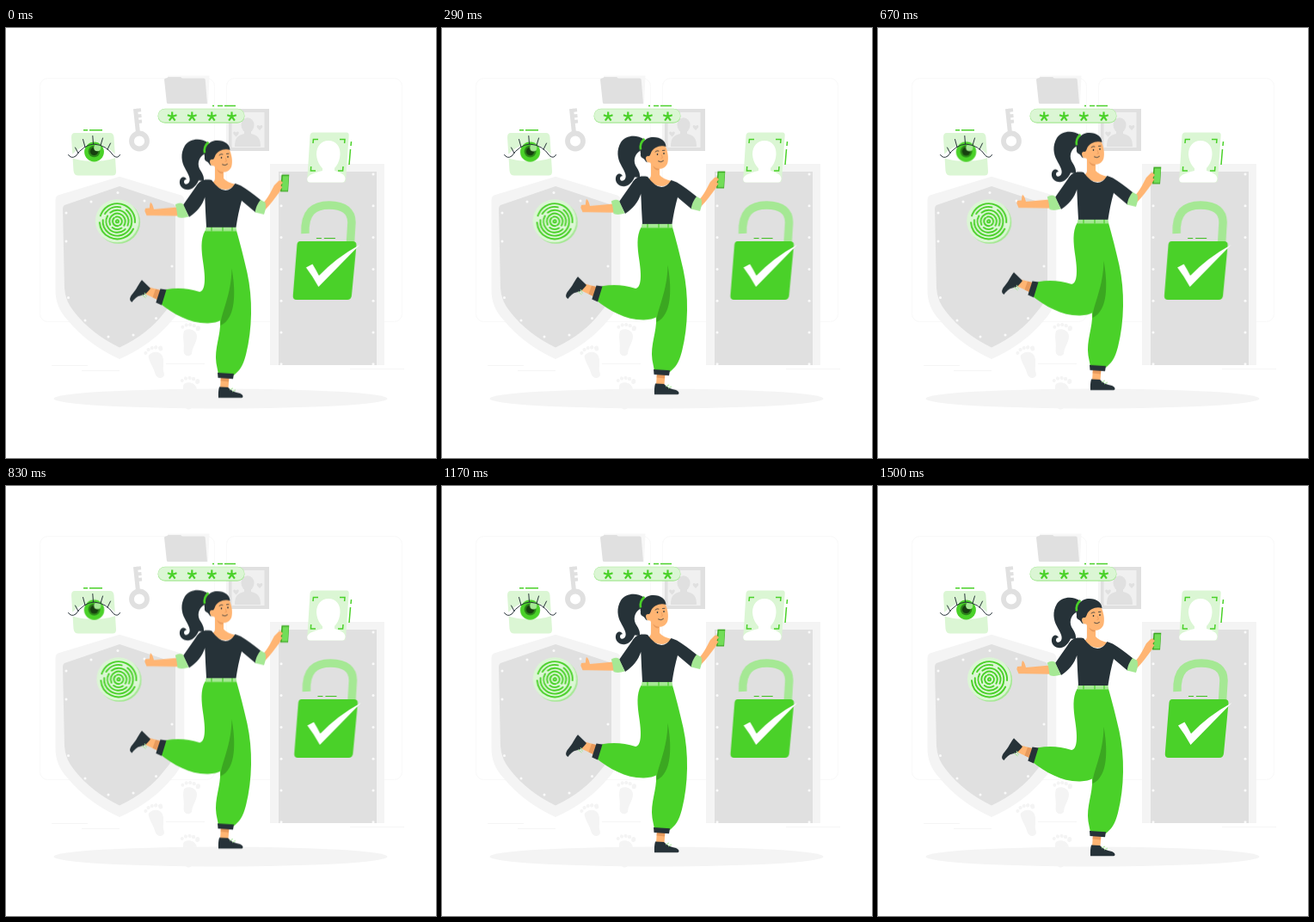
An HTML page that plays this animation: 500x500 px, repeating every 1.54 s.

```html
<!DOCTYPE html>
<html lang="en">
<head>
<meta charset="utf-8">
<title>Secure access</title>
<style>
html, body { margin: 0; width: 100%; height: 100%; overflow: hidden; background: #fff; }
svg { display: block; width: 100vw; height: 100vh; }
.green { fill: #4ad129; }
.mid { fill: #a5e894; }
.pale { fill: #dbf6d4; }
.dark { fill: #263238; }
.skin { fill: #ffb573; }
.tan { fill: #e89a5c; }
.shade { fill: #3ba721; }
.g1 { fill: #e0e0e0; }
.g2 { fill: #f4f4f4; }
.white { fill: #fff; }
.line { fill: none; stroke: #4ad129; stroke-width: 1.5; }
.ink { fill: none; stroke: #263238; stroke-linecap: round; }
.faint { fill: none; stroke: #f9f9f9; }

/* 1500 ms of motion, then a short rest */
.float, .shake, .pulse { animation: 1540ms linear -20ms infinite; }
.float { animation-name: float; }
.shake { animation-name: shake; }
.pulse { animation-name: pulse; transform-origin: 102.5px 144px; }
@keyframes float {
  0%, 97.4%, 100% { transform: translateY(0); }
  48.7% { transform: translateY(-10px); }
}
@keyframes shake {
  0%, 97.4%, 100% { transform: translateX(0); }
  9.74%, 87.66% { transform: translateX(-1px); }
  19.48%, 77.92% { transform: translateX(2px); }
  29.22%, 48.7%, 68.18% { transform: translateX(-4px); }
  38.96%, 58.44% { transform: translateX(4px); }
}
@keyframes pulse {
  0%, 97.4%, 100% { transform: scale(1); }
  48.7% { transform: scale(1.03); }
}
</style>
</head>
<body>
<svg viewBox="0 0 500 500">
  <defs>
    <g id="foot">
      <path d="M-8 -10C-8 -16 6 -17 8 -8C9 0 4 6 5 12C5 18 -4 18 -5 11C-5 3 -8 -2 -8 -10Z"/>
      <circle cx="-10" cy="-16" r="2"/><circle cx="-6" cy="-19" r="2.1"/>
      <circle cx="-1.5" cy="-20" r="2.1"/><circle cx="3" cy="-19.5" r="2.2"/>
      <ellipse cx="8" cy="-17" rx="2.6" ry="3"/>
    </g>
    <path id="heart" d="M0 3.4C-6 -1 -2.5 -4 0 -1.5C2.5 -4 6 -1 0 3.4Z"/>
    <path id="star" d="M0 0V-5.5M0 0L-5.3 -1.7M0 0L5.3 -1.7M0 0L-3.4 4.7M0 0L3.4 4.7"/>
  </defs>

  <!-- backdrop -->
  <g class="faint">
    <rect x="39.5" y="58.5" width="203" height="283" rx="9"/>
    <rect x="256.5" y="58.5" width="204" height="283" rx="9"/>
    <path d="M53 392.5H95M88 398.5H132M186 390.5H231M400 396.5H463" stroke="#f5f5f5"/>
  </g>
  <g class="g2">
    <use href="#foot" transform="translate(176 391) rotate(-14)"/>
    <use href="#foot" transform="translate(213 365) rotate(8)"/>
    <use href="#foot" transform="translate(213 427) rotate(6)"/>
  </g>
  <ellipse class="g2" cx="249.5" cy="431" rx="194" ry="11.5"/>

  <!-- folder -->
  <path d="M188 55.5H236.500L235 88H190Z" fill="#f7f7f7"/>
  <path class="g1" d="M184 60Q184 58.500 186 58.500L189 57H203L205 58.500H230Q231.500 58.500 231.700 60L234 88H188Q187 88 186.800 86Z"/>

  <!-- key -->
  <g fill="none" stroke="#e0e0e0">
    <circle cx="155" cy="131.500" r="9" stroke-width="5.800"/>
    <path d="M153.500 122L150.500 94" stroke-width="5"/>
    <path d="M151 96L157 95.300M152 102.500L157.500 102M153 109L158 108.500" stroke-width="4"/>
  </g>

  <!-- portrait -->
  <path class="g2" d="M256 94H261V143H256Z"/>
  <rect class="g1" x="259" y="94" width="47" height="49"/>
  <rect x="262.500" y="98" width="38" height="41" fill="#f0f0f0"/>
  <g class="g1">
    <ellipse cx="281" cy="113" rx="7.500" ry="8.800"/>
    <path d="M277 117H285V123C293 125 296 128 296 138H266C266 128 269 125 277 123Z"/>
    <use href="#heart" x="267.500" y="123"/><use href="#heart" x="295" y="115.500"/>
  </g>

  <!-- shield -->
  <path class="g2" d="M132 172.800L62 194Q57.500 195 57.500 200V305Q57.500 325 72 340Q95 368 132 385Q170 368 193 340Q207.300 325 207.300 305V200Q207.300 195 202 194Z"/>
  <path class="g1" d="M132 184L68 206Q66 207 66 210L68 303Q69 318 80 331Q100 356 132 371.500Q165 356 184 331Q196.500 318 197 303V208Q197 206 195 205Z"/>
  <!-- door -->
  <path class="g2" d="M307 158H440V392H307Z"/>
  <path class="g1" d="M317 167H431V392H317Z"/>
  <g id="rivets" fill="#fafafa"></g>

  <!-- password -->
  <rect class="mid" x="176.500" y="93.800" width="101" height="17" rx="8.500"/>
  <rect class="pale" x="177" y="94.300" width="100" height="15.200" rx="7.600"/>
  <g class="line" style="stroke-width:2.2">
    <use href="#star" x="193.200" y="103"/><use href="#star" x="216.300" y="103"/>
    <use href="#star" x="239.300" y="103"/><use href="#star" x="262.500" y="103"/>
  </g>
  <path class="line" d="M240 90.500H242M246 90.500H252M254 90.500H267"/>

  <!-- eye -->
  <path class="pale" d="M80 122H121Q125 122 125.500 127L128 167Q128 171.500 124 171.500H84Q79 171.500 78.500 166L76 127Q76 122 80 122Z"/>
  <path class="white" d="M74 150C84 139 93 135 102 135C113 135 121 140 130 150C116 156 90 157 74 150Z"/>
  <path class="line" d="M90 118.700H95M97 118.700H112"/>
  <g class="pulse">
    <circle class="green" cx="102.500" cy="144" r="11.400"/>
    <circle cx="102.500" cy="143.500" r="6.800" fill="#2b8219"/>
    <circle cx="102.500" cy="143.500" r="4.600" fill="#173f10"/>
    <circle class="mid" cx="106.200" cy="139.300" r="4"/>
  </g>
  <path class="ink" d="M72.500 147.500Q76 152.500 81 149Q90 136 102 135Q117 136 125 148.500Q130 152.500 132.500 147.500M84 145.500L80.500 139M92 138.500L89.500 129.500M101.500 135L100.800 125.500M110 136.500L112.500 128M118 141L121.500 134"/>

  <!-- face scan -->
  <path class="pale" d="M357 121.500H396Q399 121.500 398.700 125L395 177Q394.700 179.500 392 179.500H353Q350 179.500 350.300 176L353.500 125Q354 121.500 357 121.500Z"/>
  <path class="white" d="M368 158H382V166C389 168 394 170 394.500 175Q394 179.500 391 179.500H354Q350 179.500 350.300 175C352 170 360 168 368 166Z"/>
  <path class="white" d="M375 131C384 131 389 138 388.500 147C388 157 382 166 375 166C368 166 361.500 157 361 147C361 138 366 131 375 131Z"/>
  <path class="line" d="M357 134L357.400 129.500H363M388 129.500H394L393.600 134M354.700 161L354.400 166H360M386 166H391.600L392 161M401.500 132L401 137M400.500 141L399 159"/>

  <!-- fingerprint -->
  <g class="shake">
    <ellipse class="mid" cx="130.800" cy="225.800" rx="25.300" ry="25"/>
    <ellipse class="pale" cx="129.300" cy="224.300" rx="25.300" ry="25"/>
    <g id="rings" class="line" style="stroke-width:1.9" stroke-linecap="round"></g>
  </g>

  <!-- padlock -->
  <g class="shake">
    <path d="M348 239C347 214 358 206 376 206C394 206 402 214 402 226L400.500 250" fill="none" stroke="#a5e894" stroke-width="9.500"/>
    <path d="M361 244.500H367M370 244.500H383" stroke="#3fbf20"/>
    <path class="green" d="M342 248H403Q408 248 407.500 253L402 311Q401.500 316 397 316H338Q333.300 316 333.800 311L338.500 252Q339 248 342 248Z"/>
    <path class="white" d="M349 278.500L356.500 274.500Q360.500 281 364 288Q384 267 411.500 252Q388 276 363.500 301Q357 289 349 278.500Z"/>
  </g>

  <!-- woman -->
  <g class="float">
    <path class="dark" d="M235 133.500C227 128 214 128 208 137C202.500 146 204 156 208 163C211 169 214.500 174 213.500 178C212.500 182.500 207.500 183 207 179.500C207 177 208.500 176 210 176.300C208 172 203 173 202 178C201 184 206 188.700 212 188.300C218 187.500 222 182 224 177.500L230 178C230.500 172 228 169 225 164C221.500 156 226 149 231 146.500Z"/>
    <!-- raised foot -->
    <path class="skin" d="M181 305.500L166 301.500L162 309.500L176 316Z"/>
    <path class="tan" d="M181 305.500L174 303.700L170.500 313.500L176 316Z"/>
    <path class="dark" d="M158 293.300L168 303C164.500 308 161 311 157 311.300C152 312 149 316 146.500 319C143 317.500 143.500 313.500 147 309.500C152 304 154 298 158 293.300Z"/>
    <path d="M158 310.500L162.500 314M161 308L163.500 312.500" fill="none" stroke="#a5e894"/>
    <!-- standing foot -->
    <path class="skin" d="M250 405H259.500L258.500 419H249Z"/>
    <path class="tan" d="M250 406H259.400L259 411.500L249.600 410.500Z"/>
    <path class="dark" d="M248 417.500L258 418C262 422 266 424 272 425C276 426.500 276.500 430 274 430.300H247C246.700 425 247 421 248 417.500Z"/>
    <path d="M260 421L264 419M263 423L267 421" fill="none" stroke="#a5e894"/>
    <!-- trousers -->
    <path class="green" d="M231.500 236C226 246 227 258 229.500 275C232 292 232 306 225 307C212 303 200 302 186 304.300L179 320.500C195 333 214 344 235 343.500C242 343 246 342 249 340.500C250 358 242 372 244.500 390Q246 398 247 402.500L265 404C271 399 275.500 394 279 380C286.500 350 287 315 280.500 285C276 265 272 250 268 236Z"/>
    <path class="shade" d="M262.500 280C267 305 268 338 249.500 346C249.500 332 262 312 262.500 280Z"/>
    <path class="dark" d="M179.500 303.500L186.500 304.500L181 322.500L174.300 319.500ZM246 401L265 402.300L264 408.300L246.500 407Z"/>
    <path class="mid" d="M232.500 231.800H267.500L268.300 236.500H231.700Z"/>
    <path d="M239 231.800V236.500M252 231.800V236.500M263 231.800V236.500" stroke="#4ad129" stroke-width="1.200"/>
    <!-- arms -->
    <path class="skin" d="M200 208.500L172 211C171 207 169.500 203 167.800 203.300C167 206 167 208 167 209.500L162 210L161.300 213L163.500 218.300H170L201 218.800Z"/>
    <path class="skin" d="M298 205C305 198 308 190 312 183L317 178L321 177V187L318 191C312 199 307 206 301 212Z"/>
    <path class="shade" d="M320.500 170.800H329.300L328 190.500H319Z"/>
    <path d="M321.800 172.200H328.800L327.600 189.300H320.700Z" fill="#72dd58"/>
    <path class="skin" d="M315.500 181L320.500 178.500L322 180L319 183.500L321.500 185L318 190Z"/>
    <!-- neck and shirt -->
    <path class="skin" d="M243 160H253V175Q257 180 267 182Q255 195 239 180Q243 179 243 175Z"/>
    <path class="dark" d="M239 177C230 175.500 225 177.500 221 184.500L206 206L213 220C222 214 228 207 231.300 197Q232 215 233 232H267.500Q270 215 274 201L290 214.500L296.500 200.500Q283 189.500 273 183.500L266.500 181Q255 199 239 177Z"/>
    <path class="mid" d="M196.800 205.500Q202 202.500 206 205L212.500 219.500Q205 222 199.500 220Q199 212 196.800 205.500ZM296 200L301.500 203Q303 209 300 217L289.500 214.500Q291 206 296 200Z"/>
    <!-- head -->
    <path class="skin" d="M240 146C246 138 256 138 259.500 141C262.500 147 263.800 155 262.300 161C260.500 167 254 169.500 248.500 166.500C245 164.500 243 162.500 242 160.500C238.500 161 236.500 158 236.500 154.500C237 152 239 151 242 152Z"/>
    <path class="tan" d="M245 164.500Q249 168 253 168Q249.500 172 245 164.500Z"/>
    <path class="dark" d="M231 150C229 138 237 130.800 246 131C254 131.300 260 135 260.500 142C254 139.500 246 143 243.500 148C242 152 241.500 153.500 240 153C236 152.500 236.500 157 239 160.500C236 159.500 236 156.500 233.500 155.500C231 154.500 230.500 152.500 231 150Z"/>
    <path d="M231 145.500Q229.500 138 235.500 133" fill="none" stroke="#4ad129" stroke-width="2.600"/>
    <ellipse class="dark" cx="250.500" cy="151" rx=".8" ry="1.100"/>
    <ellipse class="dark" cx="258" cy="150" rx=".8" ry="1.100"/>
    <path class="ink" stroke-width=".8" d="M248 148Q250 146 252 147M256.500 146.500L259 146.300M251.500 159Q255 161 257.500 158.500"/>
    <path d="M255 151L256.500 155L254.500 155.500" fill="none" stroke="#e89a5c" stroke-width=".8"/>
  </g>
</svg>
<script>
const add = (id, tag, attrs) => {
  const el = document.createElementNS("http://www.w3.org/2000/svg", tag);
  for (const k in attrs) el.setAttribute(k, attrs[k]);
  document.getElementById(id).append(el);
};
const rivet = (cx, cy) => add("rivets", "circle", { cx, cy, r: 1.5 });

for (let i = 0; i < 7; i++) {
  rivet(320, 170 + i * 36.8);
  rivet(427, 170 + i * 36.8);
}
[[130, 191.5], [70, 215], [70, 248], [99, 202], [161, 201], [193, 277], [72.5, 313.5],
 [92, 340], [119, 359], [148, 357], [174.5, 337.5]].forEach(p => rivet(...p));

for (let i = 0; i < 6; i++) {
  add("rings", "circle", {
    cx: 129.5, cy: 224.8, r: 1.6 + i * 3.8, pathLength: 100,
    "stroke-dasharray": i % 2 ? "42 6 46 6" : "66 7 20 7",
    transform: `rotate(${i * 77} 129.5 224.8)`
  });
}
</script>
</body>
</html>
```
